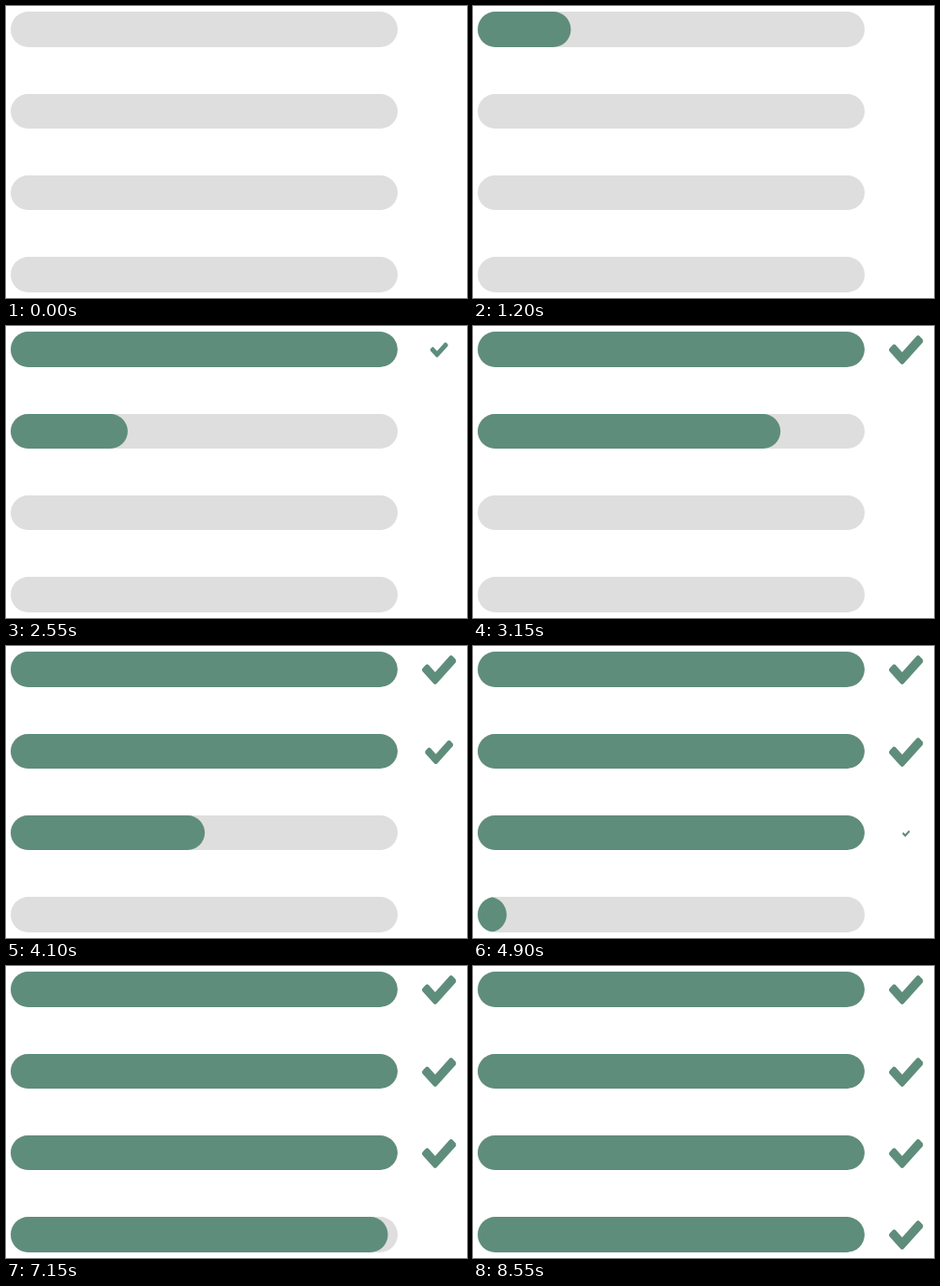
Animation of 492 by 312 pixels, one loop 8.6 s. Source, as an HTML page:

```html
<!DOCTYPE html>
<html lang="en">
<head>
<meta charset="utf-8">
<title>Progress bars</title>
<style>
  /* Clock in ms, ticking every 50 ms; all poses derive from it */
  @property --t {
    syntax: "<number>";
    inherits: true;
    initial-value: 0;
  }
  @keyframes clock {
    from { --t: 0; }
    to { --t: 8600; }
  }
  html, body {
    margin: 0;
    width: 100%;
    height: 100%;
    overflow: hidden;
    background: #fff;
  }
  .stage {
    position: relative;
    width: 492px;
    height: 312px;
    overflow: hidden;
    animation: clock 8600ms steps(172) -1ms infinite;
  }
  .row {
    position: absolute;
    left: 5px;
    top: var(--y);
    height: var(--h);
  }
  .track {
    position: relative;
    width: 413px;
    height: 100%;
    border-radius: 19px;
    background: #dedede;
    overflow: hidden;
  }
  .fill {
    position: absolute;
    left: -87px;
    width: 500px;
    height: 100%;
    border-radius: 19px;
    background: #5f8d7b;
    transform: translateX(calc(clamp(0, (var(--t) - var(--start)) / var(--time), 1) * 413px - 413px));
  }
  .check {
    position: absolute;
    left: 439px;
    top: 4px;
    width: 36.5px;
    height: 31px;
    fill: #5f8d7b;
    transform: scale(clamp(0, (var(--t) - var(--done)) / 760, 1));
  }
</style>
</head>
<body>
<svg width="0" height="0" style="position:absolute">
  <symbol id="tick" viewBox="0 0 36.5 31">
    <path d="M36.5 6Q36.5 7.1 35.85 7.8L15.6 30.3Q14.9 31 14 31T12.4 30.3L.66 17.3Q0 16.5 0 15.5T.66 13.7L3.85 10.2Q4.5 9.45 5.45 9.45T7.05 10.2L14 17.9 29.4 .73Q30.1 0 31 0T32.6 .73L35.85 4.3Q36.5 5 36.5 6Z"/>
  </symbol>
</svg>
<div class="stage">
  <div class="row" style="--y:6px; --h:38px; --start:899; --time:1250; --done:2150">
    <div class="track"><div class="fill"></div></div>
    <svg class="check"><use href="#tick"/></svg>
  </div>
  <div class="row" style="--y:94px; --h:37px; --start:2172; --time:1250; --done:3470">
    <div class="track"><div class="fill"></div></div>
    <svg class="check"><use href="#tick"/></svg>
  </div>
  <div class="row" style="--y:181px; --h:37px; --start:3473; --time:1250; --done:4728">
    <div class="track"><div class="fill"></div></div>
    <svg class="check"><use href="#tick"/></svg>
  </div>
  <div class="row" style="--y:268px; --h:38px; --start:4713; --time:2500; --done:7213">
    <div class="track"><div class="fill"></div></div>
    <svg class="check"><use href="#tick"/></svg>
  </div>
</div>
</body>
</html>
```
